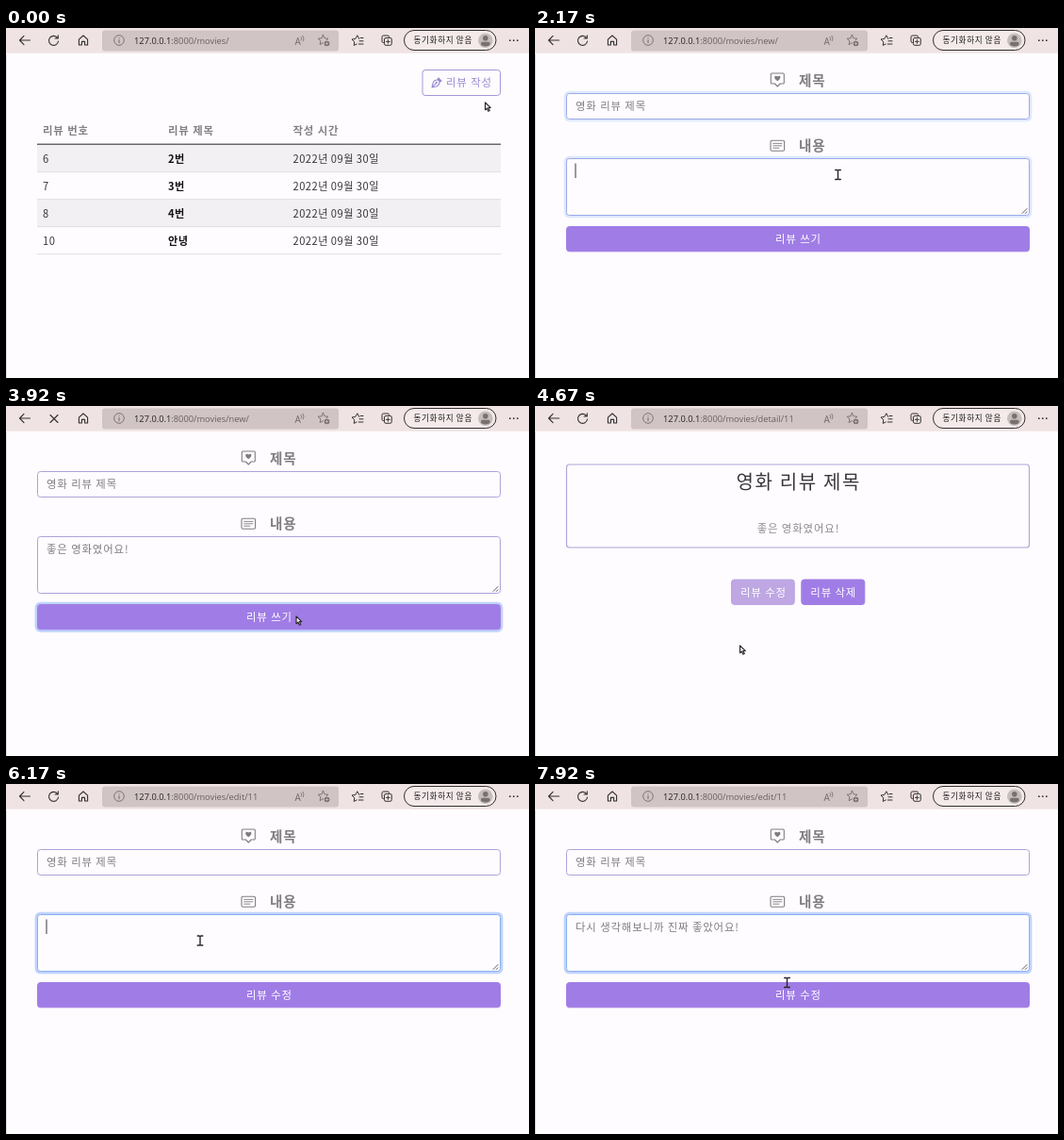
An HTML page with a canvas for the animation above (8 s loop, 555 by 371 pixels).

```html
<!DOCTYPE html>
<html lang="ko">
<head>
<meta charset="utf-8">
<title>리뷰 게시판</title>
<style>
html, body { margin: 0; width: 100%; height: 100%; overflow: hidden; background: #fefcfe; }
canvas { display: block; width: 100vw; height: 100vh; }
</style>
</head>
<body>
<canvas id="stage"></canvas>
<script>
const W = 555, H = 371, LOOP = 8000;
const canvas = document.getElementById('stage');
const ctx = canvas.getContext('2d');
const KO = '"Noto Sans CJK KR", "Noto Sans CJK", sans-serif';
const LATIN = '"Open Sans", "Noto Sans", sans-serif';
const PURPLE = '#a07de6', PALE = '#bea7e3', LINE = '#b0a6da', GREY = '#807d81', INK = '#39363a';
const PAGE = '#fefcfe';

const TITLE = '영화 리뷰 제목';
const FIRST = '좋은 영화였어요!';
const SECOND = '다시 생각해보니까 진짜 좋았어요!';

// time, x, y, pointer kind from that time on
const POINTER = [
  [0, 508, 78, 'arrow'], [80, 508, 78, 'arrow'], [250, 492, 60, 'hand'],
  [460, 492, 60, 'arrow'], [740, 392.5, 90, 'beam'], [1850, 392.5, 90, 'beam'],
  [2050, 321.5, 155.5, 'beam'], [3050, 321.5, 155.5, 'beam'], [3430, 307.5, 222, 'arrow'],
  [4150, 307.5, 222, 'arrow'], [4300, 270, 266, 'arrow'], [4420, 217, 253, 'arrow'],
  [5020, 217, 253, 'arrow'], [5180, 255, 232, 'arrow'], [5300, 246.5, 205, 'hand'],
  [5700, 246.5, 205, 'arrow'], [5890, 206, 166, 'beam'], [7700, 206, 166, 'beam'],
  [7830, 276, 192, 'beam'], [7910, 267.5, 210.5, 'beam'], [8000, 267.5, 210.5, 'beam']
];

const clamp = v => Math.max(0, Math.min(1, v));
const smooth = v => v * v * (3 - 2 * v);
const fade = (t, start) => smooth(clamp((t - start) / 150));
const mix = (a, b, k) => 'rgb(' + a.map((v, i) => Math.round(v + (b[i] - v) * k)) + ')';

// Every state a text passes through while typed with a Korean keyboard
function strokes(text) {
  const initials = 'ㄱㄲㄴㄷㄸㄹㅁㅂㅃㅅㅆㅇㅈㅉㅊㅋㅌㅍㅎ';
  const states = [''];
  let done = '';
  for (const ch of text) {
    const code = ch.charCodeAt(0) - 0xAC00;
    if (code >= 0 && code < 11172) {
      states.push(done + initials[Math.floor(code / 588)]);
      if (code % 28) states.push(done + String.fromCharCode(0xAC00 + code - code % 28));
    }
    done += ch;
    states.push(done);
  }
  return states;
}
const typing = (text, start, end) => {
  const states = strokes(text);
  return t => states[Math.floor(clamp((t - start) / (end - start)) * (states.length - 1))];
};
const typeTitle = typing(TITLE, 870, 1830);
const typeFirst = typing(FIRST, 2200, 2990);
const typeSecond = typing(SECOND, 6200, 7680);

function text(str, x, cy, o = {}) {
  const { size = 11.4, weight = 400, color = INK, gap = 0.88, align = 'left', font = KO } = o;
  ctx.font = `${weight} ${size}px ${font}`;
  ctx.letterSpacing = gap + 'px';
  ctx.textAlign = 'left';
  ctx.fillStyle = color;
  const width = ctx.measureText(str).width;
  ctx.fillText(str, align === 'center' ? x - (width - gap) / 2 : x, cy + size * 0.37);
  return width;
}

function box(x, y, w, h, r, fill, stroke, line = 1) {
  ctx.beginPath();
  ctx.roundRect(x, y, w, h, r);
  if (fill) { ctx.fillStyle = fill; ctx.fill(); }
  if (stroke) { ctx.strokeStyle = stroke; ctx.lineWidth = line; ctx.stroke(); }
}

function path(d, x, y, stroke, line = 1, fill, scale = 1) {
  const p = new Path2D(d);
  ctx.save();
  ctx.translate(x, y);
  ctx.scale(scale, scale);
  ctx.lineCap = ctx.lineJoin = 'round';
  if (fill) { ctx.fillStyle = fill; ctx.fill(p); }
  if (stroke) { ctx.strokeStyle = stroke; ctx.lineWidth = line; ctx.stroke(p); }
  ctx.restore();
}

function circle(x, y, r, fill, stroke, line = 1) {
  box(x - r, y - r, r * 2, r * 2, r, fill, stroke, line);
}

function starPath(r) {
  let d = '';
  for (let i = 0; i < 10; i++) {
    const a = -Math.PI / 2 + i * Math.PI / 5, q = i % 2 ? r * 0.48 : r;
    d += (i ? 'L' : 'M') + (Math.cos(a) * q).toFixed(2) + ' ' + (Math.sin(a) * q).toFixed(2);
  }
  return d + 'Z';
}

function browserBar(route, loading) {
  const dark = '#343031', mid = '#756b6c', bar = '#efe3e3', field = '#d1c4c4';
  ctx.fillStyle = bar;
  ctx.fillRect(0, 0, W, 26.7);
  box(102, 2.5, 251, 22, 3, field);
  path('M5.5 0H-5.5M-1 -4.7L-5.5 0L-1 4.7', 20, 13, dark, 1.1);
  if (loading) path('M-4 -4L4 4M4 -4L-4 4', 51, 13.5, dark, 1.1);
  else path('M4.2 -2.6A5 5 0 1 0 5 .8M4.8 -5.4V-2.2H1.6', 50.5, 13.2, dark, 1.1);
  path('M-4.6 5V-.8L0 -5L4.6 -.8V5H1.6V1.4H-1.6V5Z', 82, 13, dark, 1.1);
  circle(120, 13, 5.3, null, mid, 0.9);
  path('M0 -.5V2.7M0 -2.6V-2.5', 120, 13, mid, 1);

  const url = { size: 9.3, font: LATIN, gap: 0 };
  const host = text('127.0.0.1', 136, 13.3, { ...url, color: '#242122' });
  text(':8000' + route, 136 + host, 13.3, { ...url, color: '#685f60' });

  text('A', 306.5, 14, { ...url, size: 10, color: mid });
  path('M0 -4Q1.5 -2.5 .3 -.5M2 -5.2Q4.2 -2.5 2.3 .3', 313, 13.5, mid, 0.8);
  path(starPath(5.7), 336.5, 13, mid, 0.9);
  circle(340.5, 16.5, 3.5, field);
  circle(340.5, 16.5, 2.8, mid);
  path('M-1.5 0H1.5M0 -1.5V1.5', 340.5, 16.5, field, 0.7);
  path('M1.8 -1.5L-.2 -5.2L-2.2 -1.5L-6 -1L-3.2 1.8L-3.8 5.4L-.8 4M3.2 -2.5H6M2 .8H6M1.3 4H6', 373, 13, dark, 1);
  box(399, 8, 7.6, 7.6, 1.6, null, dark);
  box(401.5, 10.5, 7.8, 7.8, 1.6, bar, dark);
  path('M-2 0H2M0 -2V2', 405.4, 14.4, dark, 0.9);
  box(422.5, 2.5, 97.5, 21, 10.5, '#f4eaea', dark, 1);
  text('동기화하지 않음', 432.5, 13, { size: 8.6, gap: 0.65, color: '#201d1e' });
  circle(508.8, 13.2, 7.8, '#c5bdbc');
  circle(508.8, 10.8, 2.8, '#777170');
  path('M-4.7 4.8V3Q-4.7 1.6 -3.2 1.6H3.2Q4.7 1.6 4.7 3V4.8Q0 8 -4.7 4.8Z', 508.8, 13.2, null, 0, '#777170');
  for (const x of [534.8, 538.8, 542.8]) circle(x, 13.2, 0.9, dark);
  ctx.fillStyle = '#dedadd';
  ctx.fillRect(0, 28, 0.8, H);
}

function listPage(t) {
  const over = fade(t, 240);
  const ink = mix([154, 138, 210], [255, 255, 255], over);
  box(442, 44.5, 82.5, 27, 3, mix([254, 252, 254], [160, 125, 230], over), '#a796da');
  path('M1.8 -5L5 -1.8L3 -.6Q2.8 3 -.6 4L-5 5L-4 .6Q-3 -2.8 .6 -3ZM-4.7 4.7L-.7 .7', 457, 58, ink, 1.1);
  path('M1.8 -5L5 -1.8L3 -.6L.6 -3Z', 457, 58, null, 0, ink);
  circle(456.8, 57.9, 1.1, ink);
  text('리뷰 작성', 467, 58, { color: ink });

  const cols = [39, 172, 304.5];
  ['리뷰 번호', '리뷰 제목', '작성 시간'].forEach((s, i) =>
    text(s, cols[i], 108.7, { weight: 700, color: '#848185' }));
  ctx.fillStyle = '#47444a';
  ctx.fillRect(33, 122.6, 492, 1.2);
  [[6, '2번'], [7, '3번'], [8, '4번'], [10, '안녕']].forEach(([id, name], i) => {
    const y = 124 + i * 29;
    if (i % 2 === 0) {
      ctx.fillStyle = '#f2f0f3';
      ctx.fillRect(33, y, 492, 28.5);
    }
    ctx.fillStyle = '#dedce0';
    ctx.fillRect(33, y + 28.2, 492, 0.9);
    const cell = { size: 11.2, gap: 0.45 };
    text(String(id), cols[0], y + 14.7, cell);
    text(name, cols[1], y + 14.7, { ...cell, weight: 700, color: '#141214' });
    text('2022년 09월 30일', cols[2], y + 14.7, cell);
  });
}

function control(x, y, w, h, focus, fill, edge) {
  if (focus > 0) {
    box(x - 1.4, y - 1.4, w + 2.8, h + 2.8, 4.4, null, `rgba(60,125,245,${0.32 * focus})`, 2.9);
  }
  box(x, y, w, h, 3, fill, edge || mix([174, 163, 218], [138, 175, 240], focus));
}

function caret(x, cy) {
  ctx.fillStyle = '#3a373b';
  ctx.fillRect(x - 0.5, cy - 8, 1, 15.5);
}

function formPage(f) {
  const label = { size: 14.6, weight: 700, color: GREY, gap: 0.9 };
  path('M-6 -7H6Q7 -7 7 -6V3Q7 4 6 4H2.8L0 7L-2.8 4H-6Q-7 4 -7 3V-6Q-7 -7 -6 -7Z', 257.3, 55, GREY, 1.1);
  path('M0 2C-5.5 -1.6 -2.5 -5 0 -2.8C2.5 -5 5.5 -1.6 0 2Z', 257.3, 54.3, null, 0, GREY);
  text('제목', 280, 55.5, label);
  box(250, 119.3, 14.6, 11, 1.5, null, GREY, 1.1);
  path('M-4.6 -2.4H4.6M-4.6 0H4.6M-4.6 2.4H1.6', 257.3, 124.8, GREY, 0.9);
  text('내용', 280, 124.7, label);

  control(33.5, 69.5, 491, 27, f.titleFocus, PAGE);
  control(33.5, 138.5, 491, 60, f.bodyFocus, PAGE);
  path('M-2.5 2.5L2.5 -2.5M.8 2.5L2.5 .8', 519.5, 194, '#4d4a4e', 0.9);
  control(33.5, 210.5, 491, 26.3, f.sendFocus, PURPLE, PURPLE);
  text(f.button, 279, 223.8, { color: '#fff', align: 'center' });

  const field = { color: GREY };
  const titleWidth = text(f.title, 43, 83, field);
  const bodyWidth = text(f.body, 43, 151.5, field);
  if (f.caret === 'title') caret(43 + titleWidth, 83);
  if (f.caret === 'body') caret(43 + bodyWidth, 151.5);
}

function detailPage(t) {
  box(33.5, 62, 491, 88, 3, PAGE, LINE, 1.2);
  text(TITLE, 279, 80.5, { size: 20, gap: 1.65, align: 'center' });
  text(FIRST, 279, 129.3, { color: '#8d8a8e', align: 'center' });
  const pressed = fade(t, 5510);
  control(208.5, 184, 66.8, 26.5, pressed, PALE, PALE);
  control(282.8, 184, 67, 26.5, 0, PURPLE, PURPLE);
  text('리뷰 수정', 242, 197.3, { color: '#fff', align: 'center' });
  text('리뷰 삭제', 316.3, 197.3, { color: '#fff', align: 'center' });
}

function pointer(t) {
  let i = 0;
  while (i < POINTER.length - 2 && POINTER[i + 1][0] <= t) i++;
  const [t0, x0, y0, kind] = POINTER[i], [t1, x1, y1] = POINTER[i + 1];
  const k = smooth(clamp((t - t0) / (t1 - t0)));
  const x = x0 + (x1 - x0) * k, y = y0 + (y1 - y0) * k;
  const edge = '#29252b', fill = '#f3e6ea';
  if (kind === 'beam') {
    path('M-2.8 -5H-.8L0 -4.4L.8 -5H2.8M0 -4.4V4.4M-2.8 5H-.8L0 4.4L.8 5H2.8', x, y, edge, 1.4);
  } else if (kind === 'hand') {
    path('M-1.2 6V.8Q0 -.8 1.2 .8V4.2Q2.4 3.4 3.3 4.6Q4.5 3.9 5.2 5.1Q6.8 4.6 6.9 6.4V8.6Q6.8 10.4 5.6 12H.4Q-.8 10 -3 7.5Q-3.5 5.3 -1.2 6.5Z', x, y, edge, 1.3, fill, 0.9);
    path('M1.3 4.5V6.5M3.3 5V6.8M5.2 5.3V7', x, y, edge, 0.8, null, 0.9);
  } else {
    path('M0 0V9.2L2.2 7.2L3.8 10.8L5.5 10L3.9 6.6H6.7Z', x + 0.5, y + 0.8, edge, 1.3, fill, 0.87);
  }
}

function draw(t) {
  const page = t < 460 ? 'list' : t < 3990 ? 'new' : t < 5700 ? 'detail' : 'edit';
  const routes = { list: '/movies/', new: '/movies/new/', detail: '/movies/detail/11', edit: '/movies/edit/11' };
  const loading = (t > 370 && t < 500) || (t > 3660 && t < 3990) || (t > 5560 && t < 5740);
  ctx.fillStyle = PAGE;
  ctx.fillRect(0, 0, W, H);
  browserBar(routes[page], loading);

  if (page === 'list') listPage(t);
  if (page === 'detail') detailPage(t);
  if (page === 'new') {
    formPage({
      title: typeTitle(t), body: typeFirst(t), button: '리뷰 쓰기',
      titleFocus: fade(t, 680) - fade(t, 2095),
      bodyFocus: fade(t, 2095) - fade(t, 3600),
      sendFocus: fade(t, 3600),
      caret: t > 700 && t < 2095 ? 'title' : t >= 2095 && t < 3500 ? 'body' : ''
    });
  }
  if (page === 'edit') {
    formPage({
      title: TITLE, body: t < 6050 ? FIRST : typeSecond(t), button: '리뷰 수정',
      titleFocus: 0, bodyFocus: fade(t, 5890), sendFocus: 0,
      caret: t > 5900 && t < 7800 ? 'body' : ''
    });
  }
  pointer(t);
}

function frame(now) {
  const ratio = window.devicePixelRatio || 1;
  const w = Math.round(innerWidth * ratio), h = Math.round(innerHeight * ratio);
  if (canvas.width !== w || canvas.height !== h) {
    canvas.width = w;
    canvas.height = h;
  }
  ctx.setTransform(w / W, 0, 0, h / H, 0, 0);
  draw(Math.max(0, now - start) % LOOP);
  requestAnimationFrame(frame);
}
const start = performance.now();
frame(start);
</script>
</body>
</html>
```
